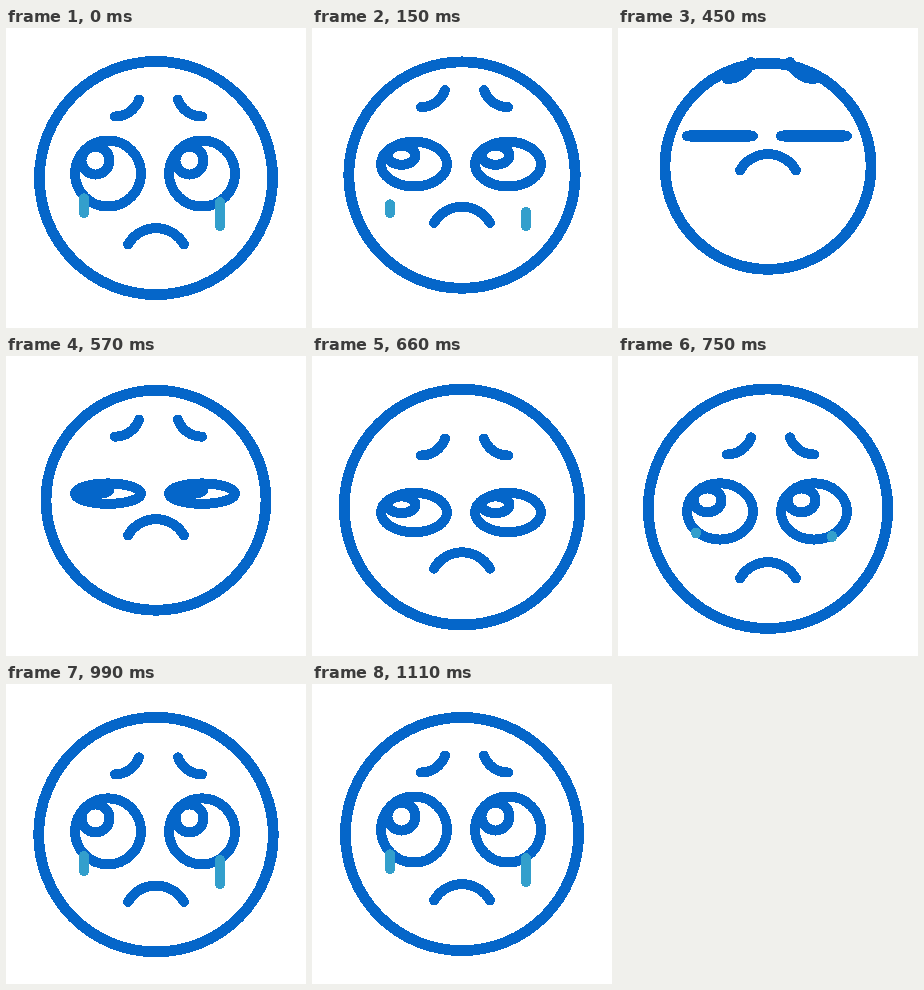
Recreate the animation shown at these times as an HTML page. Size 300 by 300 pixels, loop 1.5 s.

```html
<!DOCTYPE html>
<html lang="en">
<head>
<meta charset="utf-8">
<title>Sad face</title>
<style>
  html, body { margin: 0; width: 100%; height: 100%; overflow: hidden; background: #fff; }
  svg { display: block; width: 100vw; height: 100vh; shape-rendering: crispEdges; }
  .ink { fill: none; stroke: #0566c9; stroke-width: 10; stroke-linecap: round; }
  .tear { stroke: #339fcc; stroke-width: 10; stroke-linecap: round; }
  #head { stroke-width: 10.8; }
</style>
</head>
<body>
<svg viewBox="0 0 300 300">
  <circle id="head" class="ink" cx="150"/>
  <g id="brows" class="ink">
    <path d="M109 88.5A25.3 25.3 0 0 0 133 71.5"/>
    <path d="M196 88.5A25.3 25.3 0 0 1 172 71.5"/>
  </g>
  <g class="ink">
    <ellipse class="eye" cx="102" rx="33"/>
    <ellipse class="eye" cx="196" rx="33"/>
    <ellipse class="pupil" cx="89.5" rx="14"/>
    <ellipse class="pupil" cx="183.5" rx="14"/>
  </g>
  <path id="mouth" class="ink" d="M122 216.5A32.2 32.2 0 0 1 178 216.5"/>
  <line id="leftTear" class="tear" x1="78" x2="78"/>
  <line id="rightTear" class="tear" x1="214" x2="214"/>
</svg>
<script>
const LOOP = 1500, STEP = 30, SETTLED = 1110;
const EYE_Y = 145.5, EYE_R = 33;

// Sine ease-in-out progress from 0 to 1 between two times.
function ease(t, from, to) {
  const u = Math.min(1, Math.max(0, (t - from) / (to - from)));
  return (1 - Math.cos(Math.PI * u)) / 2;
}

// Go from 0 down to low, spring up past rest to high, then settle at 0.
function bounce(t, lowTime, low, highTime, high) {
  return low * ease(t, 0, lowTime)
    + (high - low) * ease(t, lowTime, highTime)
    - high * ease(t, highTime, SETTLED);
}

const all = s => [...document.querySelectorAll(s)];
const [head, brows, mouth, leftTear, rightTear] =
  ['head', 'brows', 'mouth', 'leftTear', 'rightTear'].map(id => document.getElementById(id));
const eyes = all('.eye'), pupils = all('.pupil');

function set(el, attrs) {
  for (const name in attrs) el.setAttribute(name, attrs[name]);
}

// A tear drains towards its foot, then grows again from the rim of the eye.
function drawTear(el, t, eyeY, ry, rim, length) {
  const drained = ease(t, 0, 340), grown = Math.min(1, (t - 740) / 190);
  const draining = drained < 1;
  const restTop = EYE_Y + EYE_R * rim;
  const y1 = draining ? restTop + length * drained : eyeY + ry * rim;
  const y2 = draining ? restTop + length : y1 + length * grown;
  set(el, { y1, y2, visibility: draining || grown > 0 ? 'visible' : 'hidden' });
}

function draw(t) {
  const grow = bounce(t, 450, -13.5, 720, 3.2);
  set(head, { cy: 150 + 0.87 * grow, r: 116.6 + grow });

  const lift = bounce(t, 450, -37.5, 660, 11);
  set(brows, { transform: `translate(0 ${lift})` });
  set(mouth, { transform: `translate(0 ${bounce(t, 420, -76, 730, 6)})` });

  const open = 1 - ease(t, 0, 390) + ease(t, 390, 870);
  const eyeY = EYE_Y + lift, ry = EYE_R * open;
  eyes.forEach(e => set(e, { cy: eyeY, ry: Math.max(ry, 0.5) }));
  pupils.forEach(p => set(p, { cy: eyeY - 13 * open, ry: Math.max(14 * open, 0.5) }));

  drawTear(leftTear, t, eyeY, ry, 0.75, 15);
  drawTear(rightTear, t, eyeY, ry, 0.87, 24);
}

function tick() {
  const t = performance.now() % LOOP;
  draw(Math.floor(t / STEP) * STEP);
  requestAnimationFrame(tick);
}
tick();
</script>
</body>
</html>
```
